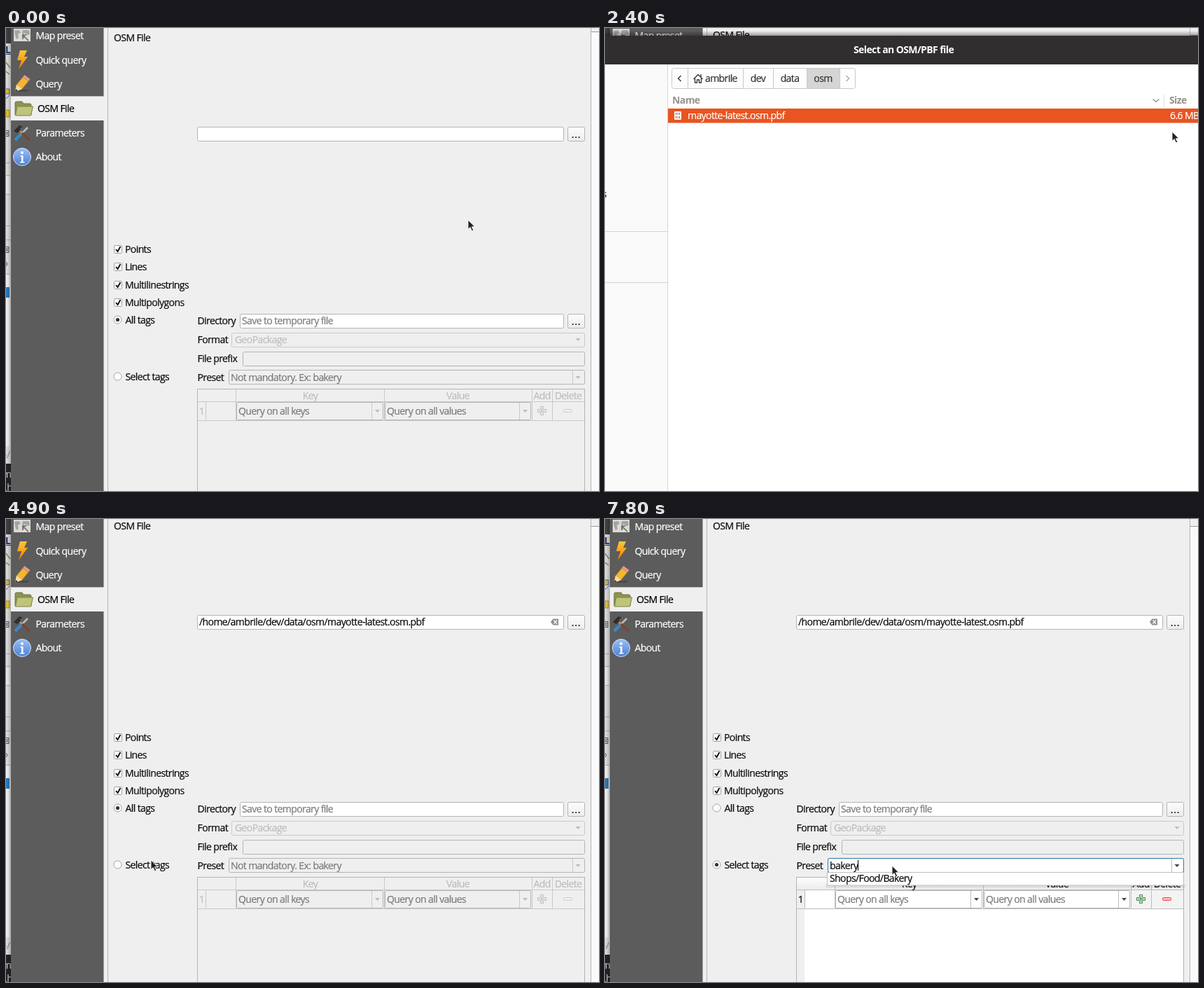
Recreate the animation shown at these times as an HTML page. Size 847 px wide and 661 px high, loop 8 s.

```html
<!DOCTYPE html>
<html lang="en">
<head>
<meta charset="utf-8">
<title>Open an OSM file</title>
<style>
html, body { margin: 0; width: 100%; height: 100%; overflow: hidden; background: #efefef; }
svg { display: block; width: 847px; height: 661px; }
text { font: 14px "Open Sans", "Noto Sans", sans-serif; letter-spacing: -.6px; white-space: pre; stroke-width: .22px; }
.bold { font-weight: 700; stroke-width: 0; }
.mid { text-anchor: middle; }
.wide { letter-spacing: .8px; }
</style>
</head>
<body>
<svg id="stage" viewBox="0 0 847 661" xmlns="http://www.w3.org/2000/svg"></svg>
<script>
const INK = '#0c0c0c', DIM = '#bdbdbd', HINT = '#7a7a7a', EDGE = '#b4b4b4', BG = '#efefef';
const FILE = 'mayotte-latest.osm.pbf', USER = 'ambrile';

// Markup helpers; text is placed by its visual middle
const text = (x, y, s, fill = INK, cls = '') =>
  `<text x="${x}" y="${y + 5}" fill="${fill}" stroke="${fill}" class="${cls}">${s}</text>`;
const rect = (x, y, w, h, fill, more = '') =>
  `<rect x="${x}" y="${y}" width="${w}" height="${h}" fill="${fill}" ${more}/>`;
const box = (x, y, x2, y2, fill = '#fff', edge = EDGE, r = 2) =>
  rect(x + .5, y + .5, x2 - x - 1, y2 - y - 1, fill, `stroke="${edge}" rx="${r}"`);
const path = (d, fill = 'none', stroke = 'none', w = 1) =>
  `<path d="${d}" fill="${fill}" stroke="${stroke}" stroke-width="${w}"/>`;
const group = (id, body, more = '') => `<g id="${id}" ${more}>${body}</g>`;
const arrow = (x, y, fill) => path(`M${x - 3.5} ${y - 2}h7l-3.5 4z`, fill);

function dots(y) {
  return box(802, y, 827, y + 21, 'url(#btn)') + text(814.5, y + 11, '...', INK, 'mid wide');
}

function check(y, label) {
  return box(154, y - 6, 166, y + 6, '#fff', '#a0a0a0', 1) +
    path(`M157 ${y}l2.5 3 4-7`, 'none', INK, 1.9) + text(170, y, label);
}

function radio(y, label, id) {
  return `<circle cx="159.5" cy="${y}" r="5.5" fill="#fff" stroke="#a0a0a0"/>
    <circle id="${id}" cx="159.5" cy="${y}" r="2.6" fill="#333"/>` + text(170.5, y + .5, label);
}

function table(on) {
  const ink = on ? INK : DIM, face = on ? '#fff' : BG, line = on ? '#bcbcbc' : '#c9c9c9';
  const cell = (x, split, end, s) => box(x, 530, end, 556, face, EDGE, 1) +
    path(`M${split}.5 531v24`, 'none', line) + text(x + 3, 542.5, s, HINT) +
    arrow((split + end) / 2, 543, on ? '#444' : DIM);
  const head = [[434.5, 'Key'], [645.5, 'Value'], [765.5, 'Add'], [803, 'Delete']];
  const green = on ? '#3d8a46' : DIM;
  return box(318, 484, 827, 505, face, EDGE) + path('M809.5 485v19', 'none', line) +
    arrow(817, 495, on ? '#444' : DIM) +
    rect(273.5, 511.5, 553, 200, face, `stroke="${EDGE}"`) +
    rect(274, 512, 552, 17, on ? 'url(#btn)' : BG) + rect(274, 529, 11, 140, BG) +
    path('M274 529.5H826M274 556.5H826M328.5 512v44M540.5 512v44M751.5 512v44M780.5 512v44M285.5 529v27', 'none', line) +
    head.map(([x, s]) => text(x, 520.5, s, ink, 'mid')).join('') +
    text(279.5, 543, '1', ink, 'mid') +
    cell(329, 522, 539, 'Query on all keys') + cell(541, 733, 750, 'Query on all values') +
    rect(752, 530, 28, 26, on ? '#f3f3f3' : BG) + rect(781, 530, 45, 26, on ? '#f3f3f3' : BG) +
    path('M763.5 536.5h4v4h4v4h-4v4h-4v-4h-4v-4h4z', on ? '#d8f0d8' : BG, green) +
    path('M765.5 538.5v8M761.5 542.5h8', 'none', green) +
    rect(796.5, 540.5, 12, 4, on ? '#ffb9b9' : BG, `stroke="${on ? '#ea4850' : '#d8caca'}" rx="1"`);
}

const defs = `<defs>
  <linearGradient id="btn" x2="0" y2="1"><stop stop-color="#fdfdfd"/><stop offset="1" stop-color="#ececec"/></linearGradient>
  <linearGradient id="bolt" x2="0" y2="1"><stop stop-color="#fcc73a"/><stop offset="1" stop-color="#f57a00"/></linearGradient>
  <linearGradient id="info" x2="0" y2="1"><stop stop-color="#9cc0f5"/><stop offset="1" stop-color="#4a7fd6"/></linearGradient>
  <linearGradient id="up" x2="0" y2="1"><stop stop-opacity="0"/><stop offset="1" stop-opacity=".35"/></linearGradient>
  <linearGradient id="down" x2="0" y2="1"><stop stop-opacity=".3"/><stop offset="1" stop-opacity="0"/></linearGradient>
  <linearGradient id="side"><stop stop-opacity=".03"/><stop offset="1" stop-opacity=".25"/></linearGradient>
</defs>`;

const edgeStrip = rect(0, 0, 7, 661, '#e9e9e9') + rect(0, 0, 7, 22, '#444') +
  text(-1, 31, 'L', '#23306e', 'bold') + path('M0 37.5h7', 'none', '#23306e') +
  path('M0 49l6 8M0 62l5 4', 'none', '#8b8f5a', 1.5) +
  path('M0 87h5v7H0M0 101l6-6', '#e8c341', '#4169a8') +
  rect(0, 117, 5, 10, '#f5cf3c', 'stroke="#b7972c"') +
  path('M0 146.5h4v8H0M0 148l3 5M0 153l3-5M0 312.5h4v8H0M0 314l3 5M0 319l3-5', 'none', '#555') +
  path('M0 192.5h6M0 210.5h6M0 237.5h6M0 282.5h6M0 302.5h7M0 351.5h6', 'none', '#b5b5b5') +
  rect(0, 212, 5, 25, '#f6f6f6') + path('M0 334l2 3-2 3', 'none', '#555') +
  rect(0, 352, 5, 245, '#fff') + rect(0, 370, 5, 15, '#2f80c2') +
  text(-3, 609, '-/', '#999') + rect(0, 622, 7, 39, '#24252b') +
  text(-5, 637, 'm', '#ccc') + text(-2, 656, '.h', '#ccc') +
  rect(0, 0, 7, 661, 'url(#side)');

const icons =
  rect(11, 1, 24, 18, '#d9d9d6') +
  path('M12 4l6-1 3 3-4 3 1 5-3 2-2-6zM24 3l9 0 1 6-4 1-3-3-2 2 2 5-3 1-1-6z', '#a4a4a0') +
  path('M24 10l8 8M24 10v6M24 10h5', 'none', '#666', 1.5) +
  path('M20 32h10l-4 9h5L18 59l4-13h-6z', 'url(#bolt)') +
  path('M15 91h15l4-3h-15z', '#4a4a4a') +
  path('M13 91l2-10 9-11 8 6-9 11z', '#f2b632', '#a9781e', .8) +
  path('M15 81l8 6-10 4z', '#f0dcb4') + path('M24 70l2.500-3 8 6-2.500 3z', '#e39a8d') +
  path('M13 91l1-4 3 2.500z', '#333') +
  path('M13 107q0-2 2-2h8l2 3h9q2 0 2 2v14H13z', '#8d9350', '#6e743d') +
  path('M16 112h22.500l-3 13H13.500z', '#bfc47a', '#7f8549') +
  path('M23 150l8-8', 'none', '#b9bdc0', 2.5) + path('M13 160l9-9', 'none', '#3b87c8', 4.5) +
  path('M18 145l5 5', 'none', '#c98a5a', 3) + path('M23 150l11 10', 'none', '#7a4632', 3.5) +
  path('M11 147l8-8 5 2-4 2 1 3-5 4z', '#2f2f2f') +
  `<circle cx="23" cy="184" r="12.500" fill="url(#info)" stroke="#d5e3fa"/>` +
  `<circle cx="23" cy="178" r="2" fill="#fff"/>` + path('M20.5 182h4v9h2v1.500h-6.500V191h2v-7.500h-1.500z', '#fff');

const menu = [['Map preset', 11], ['Quick query', 46], ['Query', 80], ['Parameters', 150], ['About', 184]];
const sidebar = rect(7, 0, 132.5, 661, '#5c5c5c') + rect(7, 97.4, 133, 34.6, BG) + icons +
  menu.map(([s, y]) => text(42.5, y, s, '#fff')).join('') + text(45, 115, 'OSM File', '#000');

const form = text(154, 10, 'OSM File') +
  box(273, 137, 797, 158) + dots(137) +
  group('chosen', text(276, 147, `/home/${USER}/dev/data/osm/${FILE}`) +
    path('M778 147l3.500-4.500h7.500v9h-7.500z', '#8f8f8f') + path('M782.500 144.500l4.500 5m0-5l-4.500 5', 'none', '#fff', 1.2)) +
  check(312, 'Points') + check(337, 'Lines') + check(363, 'Multilinestrings') + check(388, 'Multipolygons') +
  radio(412.5, 'All tags', 'all') + radio(493.5, 'Select tags', 'some') +
  text(273.5, 414, 'Directory') + box(334, 404, 797, 425) + text(337, 414, 'Save to temporary file', HINT) + dots(404) +
  text(273.5, 441, 'Format') + box(322, 431, 827, 452, BG, '#c9c9c9') + text(327, 441, 'GeoPackage', DIM) + arrow(817, 441, DIM) +
  text(273.5, 468, 'File prefix') + box(338, 458, 827, 479, BG) +
  text(273.5, 495, 'Preset') +
  group('off', table(false)) + group('on', table(true)) +
  group('focus', box(318, 484, 827, 505, 'none', '#2f78a8')) +
  text(321, 495, 'Not mandatory. Ex: bakery', HINT).replace('<text', '<text id="hint"') +
  text(321, 495, '').replace('<text', '<text id="typed"') +
  rect(321, 487, 1, 15, '#000', 'id="caret"') + group('popup', '');

const panel = rect(139, 0, 708, 661, BG) + path('M145.500 0v661M835.500 0v661', 'none', EDGE) +
  rect(836, 0, 11, 661, '#fafafa') +
  group('thumb', rect(836, -10, 11, 10, BG) + path('M836 .500h11', 'none', '#999')) +
  group('form', form);

const crumbs = [[118, 197], [197, 240], [240, 288], [288, 335]];
const dialog = rect(0, 4, 847, 7, 'url(#up)') + rect(0, 705, 847, 9, 'url(#down)') +
  rect(0, 11, 847, 694, '#fff') + rect(0, 11, 847, 41, '#302e2e') +
  text(426.5, 31, 'Select an OSM/PBF file', '#fff', 'mid bold') +
  rect(0, 52, 89, 653, '#fafafa') + path('M89.500 52v612M0 290.500h89M0 363.500h89', 'none', '#d4d4d4') +
  text(-4, 237, 's', '#333') +
  rect(0, 664, 847, 41, '#fafafa') + path('M0 664.500h847', 'none', '#d4d4d4') +
  box(95, 57, 358, 87, '#fdfdfd', '#cbc9c7', 3) + rect(289, 58, 46, 28, '#d6d5d4') +
  crumbs.map(([a]) => path(`M${a}.500 58v28`, 'none', '#cbc9c7')).join('') + path('M335.500 58v28', 'none', '#cbc9c7') +
  path('M108.500 68l-4 4 4 4', 'none', '#333', 1.4) + path('M344.500 68l4 4-4 4', 'none', '#aaa', 1.4) +
  path('M126.500 73l6.500-6.500 6.500 6.500M128.500 72v6h3v-4h3v4h3v-6M137 70v-4', 'none', '#333', 1.3) +
  text(143, 72, USER, '#333') +
  ['dev', 'data', 'osm'].map((s, i) => text((crumbs[i + 1][0] + crumbs[i + 1][1]) / 2, 72, s, '#333', 'mid')).join('') +
  text(96, 103, 'Name', '#96938e', 'bold') + text(806, 103, 'Size', '#96938e', 'bold') +
  path('M782.500 101.500l4.500 4 4.500-4', 'none', '#8a8a8a', 1.2) + path('M798.500 95v19', 'none', '#e2e2e2') +
  rect(90, 115, 757, 20.5, '#e95420') +
  rect(99, 119, 10, 12, '#fbf5f2', 'rx="1"') +
  path('M101.500 121v3m2.500-3v3m2.500-3v3m-5 2v3m2.500-3v3m2.500-3v3', 'none', '#8a6a60') +
  text(118, 125, FILE, '#fff') + text(807, 125, '6.6 MB', '#fff');

const pointers =
  group('hand', path('M0 0v13.500l3.100-2.900 2.400 5.300 2.300-1-2.400-5.100h4.200z', '#222', '#fff', .9)) +
  group('beam', path('M-3 -6.500h2.500l.500.500.500-.500h2.500M0 -6v12M-3 6.500h2.500l.500-.500.500.500h2.500', 'none', '#111', 1.2));

stage.innerHTML = defs + edgeStrip + panel + sidebar + group('dialog', dialog) + pointers;

// time, x, y of the pointer
const route = [
  [0, 660, 274], [100, 677, 278], [200, 696, 283], [1100, 696, 283], [1300, 688, 276], [1400, 688, 276],
  [1800, 738, 222], [2200, 807, 153], [2300, 810, 148], [2500, 810, 148], [2700, 620, 112], [2900, 250, 72],
  [3000, 112, 70], [3100, 99, 84], [3200, 220, 122], [3300, 326, 133], [4200, 326, 133], [4500, 268, 330],
  [4700, 205, 518], [4900, 207, 487], [5100, 207, 487], [5500, 318, 492], [5900, 409, 497],
  [6100, 409, 497], [6200, 410, 497], [7000, 410, 497], [7100, 410, 495], [8000, 410, 495]
];
const typing = [[7100, 'b'], [7300, 'ba'], [7400, 'bak'], [7500, 'bake'], [7700, 'baker'], [7800, 'bakery']];
const presets = ['Shops/Food/Bakery', 'Barriers/Bank', 'Sports/Baseball', 'Facilities/Library', 'Barriers/Block', 'Shops/Books'];

const $ = id => document.getElementById(id);
const show = (id, on) => $(id).setAttribute('display', on ? 'inline' : 'none');
const move = (id, v) => $(id).setAttribute('transform', v);

function at(t) {
  const i = Math.max(1, route.findIndex(p => p[0] > t));
  const a = route[i - 1], b = route[i], k = (t - a[0]) / (b[0] - a[0]);
  return [a[1] + (b[1] - a[1]) * k, a[2] + (b[2] - a[2]) * k].map(Math.round);
}

function drawPopup(word) {
  const n = [0, 6, 3][word.length] ?? 1, h = n * 17.5;
  $('popup').innerHTML = n ? rect(315, 507 + h - 4, 514, 6, '#000', 'opacity=".08" rx="3"') +
    rect(317.5, 504.5, 509, h + 1, '#fff', 'stroke="#bdbdbd"') +
    presets.slice(0, n).map((s, i) => text(321, 512.5 + i * 17.5, s)).join('') : '';
}

let last = -1;
function render(t) {
  if (t === last) return;
  last = t;
  const scrolled = t >= 600, picked = t >= 5100, word = typing.filter(k => k[0] <= t).pop()?.[1] ?? '';
  move('form', `translate(0 ${scrolled ? 0 : 4})`);
  move('thumb', `translate(0 ${scrolled ? 10 : 5})`);

  show('dialog', t >= 2400 && t < 4000);
  const squash = t < 3800 ? 1 : t < 3900 ? .69 : .2;
  move('dialog', `translate(0 360) scale(1 ${squash}) translate(0 -360)`);

  show('chosen', t >= 3800);
  show('all', !picked);
  show('some', picked);
  show('off', !picked);
  show('on', picked);
  show('focus', t >= 5900);
  show('hint', !word);
  $('typed').textContent = word;
  $('caret').setAttribute('x', 321 + (word ? Math.round($('typed').getComputedTextLength()) : 0));
  show('caret', word || (t >= 5900 && t < 6500));
  drawPopup(word);

  const [x, y] = at(t), beam = picked && x >= 318 && !word;
  show('hand', !beam);
  show('beam', beam);
  move(beam ? 'beam' : 'hand', `translate(${x} ${y})`);
}

const start = performance.now();
function tick() {
  const t = (performance.now() - start) % 8000;
  render(Math.floor(t / 100) * 100);
  requestAnimationFrame(tick);
}
render(0);
tick();
</script>
</body>
</html>
```
